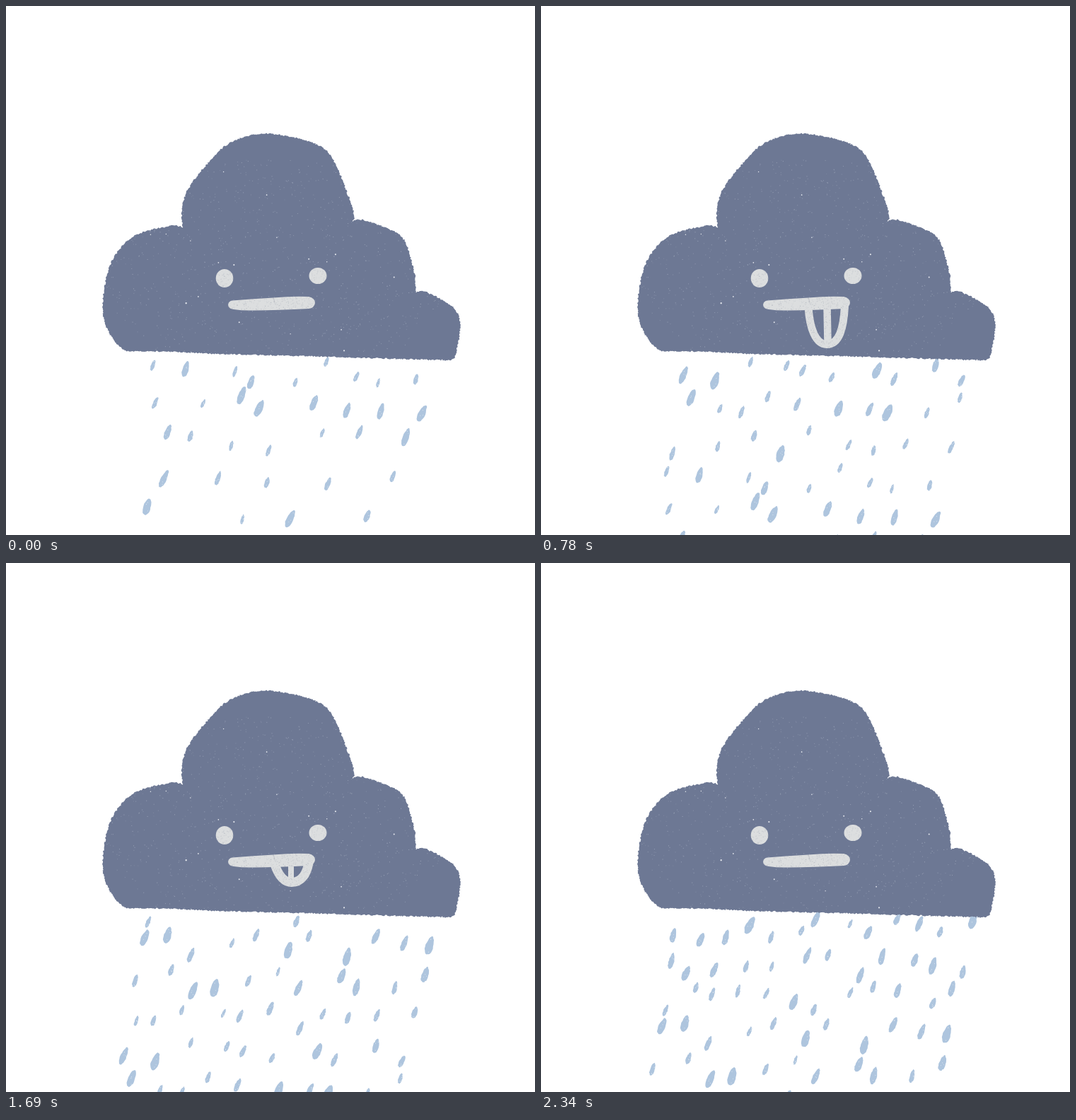
Write an HTML page with a canvas that moves like this. It is 748 px wide and 748 px high and loops after 2.47 s.

```html
<!DOCTYPE html>
<html lang="en">
<head>
<meta charset="utf-8">
<title>Rain cloud</title>
<style>
  html, body { margin: 0; width: 100%; height: 100%; overflow: hidden; background: #fff; }
  canvas { display: block; width: 748px; height: 748px; }
</style>
</head>
<body>
<canvas id="stage" width="748" height="748"></canvas>
<script>
const SIZE = 748, STEP = 130, STEPS = 19;
const CLOUD = '#6d7894', RAIN = '#aec5de', FACE = '#dcdedf';
const FALL = 25, SLANT = 0.2, CLOUD_BASE = 498;
const ctx = document.getElementById('stage').getContext('2d');

function seeded(seed) {
  return () => {
    seed = (seed + 0x6d2b79f5) | 0;
    let t = Math.imul(seed ^ (seed >>> 15), 1 | seed);
    t = (t + Math.imul(t ^ (t >>> 7), 61 | t)) ^ t;
    return ((t ^ (t >>> 14)) >>> 0) / 4294967296;
  };
}

function layer(draw) {
  const c = document.createElement('canvas');
  c.width = c.height = SIZE;
  draw(c.getContext('2d'));
  return c;
}

// Catmull-Rom curve through the key points of one lobe
function curve(p) {
  const out = [], at = i => p[Math.max(0, Math.min(p.length - 1, i))];
  for (let i = 0; i < p.length - 1; i++) {
    const [a, b, c, d] = [at(i - 1), at(i), at(i + 1), at(i + 2)];
    const n = Math.ceil(Math.hypot(c[0] - b[0], c[1] - b[1]) / 1.5);
    for (let k = 0; k < n; k++) {
      const t = k / n;
      out.push([0, 1].map(j => b[j] + 0.5 * t * (c[j] - a[j] +
        t * (2 * a[j] - 5 * b[j] + 4 * c[j] - d[j] + t * (3 * (b[j] - c[j]) + d[j] - a[j])))));
    }
  }
  return out;
}

const lobes = [
  [[170, 488], [156, 477], [141, 451], [137, 415], [150, 360], [182, 325], [232, 311], [250, 313]],
  [[250, 313], [249, 285], [262, 252], [304, 203], [338, 185], [378, 181], [438, 195], [465, 222], [491, 290], [490, 304]],
  [[490, 304], [503, 302], [545, 317], [564, 333], [578, 380], [579, 405]],
  [[579, 405], [595, 405], [634, 428], [642, 455], [635, 495], [625, 501]],
  [[625, 501], [420, 495], [300, 492], [235, 489], [170, 488]]
];

const cloud = layer(g => {
  const rnd = seeded(11), rough = v => v + (rnd() - 0.5) * 2;
  const spot = () => {
    const a = rnd() * 6.283, r = Math.sqrt(rnd());
    return [380 + Math.cos(a) * r * 245, 375 + Math.sin(a) * r * 160];
  };
  g.fillStyle = CLOUD;
  g.beginPath();
  for (const [x, y] of lobes.flatMap(curve)) g.lineTo(rough(x), rough(y));
  g.fill();
  g.globalCompositeOperation = 'source-atop';
  for (let i = 0; i < 1100; i++) {
    g.fillStyle = `rgba(190,198,214,${0.15 + 0.4 * rnd()})`;
    g.fillRect(...spot(), 1, 1);
  }
  g.fillStyle = '#e6e9ef';
  for (let i = 0; i < 24; i++) {
    g.beginPath();
    g.arc(...spot(), 0.7 + rnd() * 0.5, 0, 7);
    g.fill();
  }
});

const tongues = {
  half: { rim: 'M380 426C385 441 393 451.5 404 451.5C417 451.5 425 441 428 424', width: 13, stripe: 'M403 425V450', thin: 8 },
  full: { rim: 'M378 426C380 455 388 478.5 404 478.5C422 478.5 428 455 429.5 424', width: 11, stripe: 'M404.5 425L405.5 475', thin: 10.5 }
};

function face(tongue) {
  return layer(g => {
    const rnd = seeded(5);
    const line = (path, width) => {
      g.lineWidth = width;
      g.stroke(new Path2D(path));
    };
    const eye = (x, y, rx, ry) => {
      g.beginPath();
      g.ellipse(x, y, rx, ry, 0, 0, 7);
      g.fill();
    };
    g.fillStyle = g.strokeStyle = FACE;
    eye(309, 385, 12.3, 13);
    eye(441, 381.5, 12.5, 11.5);
    g.fill(new Path2D('M320 416.5Q350 414 378 412.5Q405 410 428 411Q437 413 437 420Q436 427 428 428Q385 430 350 430.5Q335 431 322 429Q314 428 314 422Q315 417 320 416.5Z'));
    if (tongue) {
      line(tongue.rim, tongue.width);
      line(tongue.stripe, tongue.thin);
    }
    g.globalCompositeOperation = 'source-atop';
    for (let i = 0; i < 2600; i++) {
      g.fillStyle = `rgba(125,132,150,${rnd() * 0.32})`;
      g.fillRect(295 + rnd() * 160, 368 + rnd() * 120, 1, 1);
    }
    g.strokeStyle = 'rgba(150,155,168,.4)';
    line('M378 412L380 419', 1);
  });
}

const faces = { flat: face(), half: face(tongues.half), full: face(tongues.full) };

function drawDrop(x, y, rnd) {
  const len = 6.5 + rnd() * 7, wide = len * (0.3 + rnd() * 0.14);
  ctx.save();
  ctx.translate(x, y);
  ctx.rotate(0.24 + rnd() * 0.22);
  ctx.fillStyle = RAIN;
  ctx.beginPath();
  for (let i = 0; i < 26; i++) {
    const a = i / 26 * 6.283, s = Math.sin(a);
    ctx.lineTo(Math.cos(a) * wide * (1 + 0.2 * s) + (rnd() - 0.5) * 0.9, s * len + (rnd() - 0.5) * 0.9);
  }
  ctx.fill();
  ctx.fillStyle = 'rgba(255,255,255,.65)';
  for (let i = 0; i < 3; i++) ctx.fillRect((rnd() - 0.5) * wide, (rnd() - 0.5) * len * 1.5, 0.9, 0.9);
  ctx.restore();
}

// A row of drops leaves the cloud every second step; rows grow fuller and wider
function drawRain(step) {
  for (let born = -8; born <= step + 1; born += 2) {
    const count = Math.round(9 + born * (born < 0 ? 0.6 : 0.2));
    const left = 197 - born * 1.6, right = 612 + born * 0.7;
    const gap = (right - left) / count;
    for (let i = 0; i < count; i++) {
      const rnd = seeded(born * 1000 + i * 77);
      const y = 516 + FALL * (step - born) + (rnd() - 0.5) * 34;
      const x = left + gap * (i + 0.5 + (rnd() - 0.5) * 0.6) - SLANT * (y - 516);
      if (y > CLOUD_BASE) drawDrop(x, y, rnd);
    }
  }
}

function mouthAt(step) {
  if (step < 3 || step > 13) return 'flat';
  return step % 2 ? 'half' : 'full';
}

let last = -1;
const start = performance.now();

function tick() {
  const step = Math.floor((performance.now() - start) / STEP) % STEPS;
  if (step !== last) {
    last = step;
    ctx.fillStyle = '#fff';
    ctx.fillRect(0, 0, SIZE, SIZE);
    drawRain(step);
    ctx.drawImage(cloud, 0, 0);
    ctx.drawImage(faces[mouthAt(step)], 0, 0);
  }
  requestAnimationFrame(tick);
}
tick();
</script>
</body>
</html>
```
